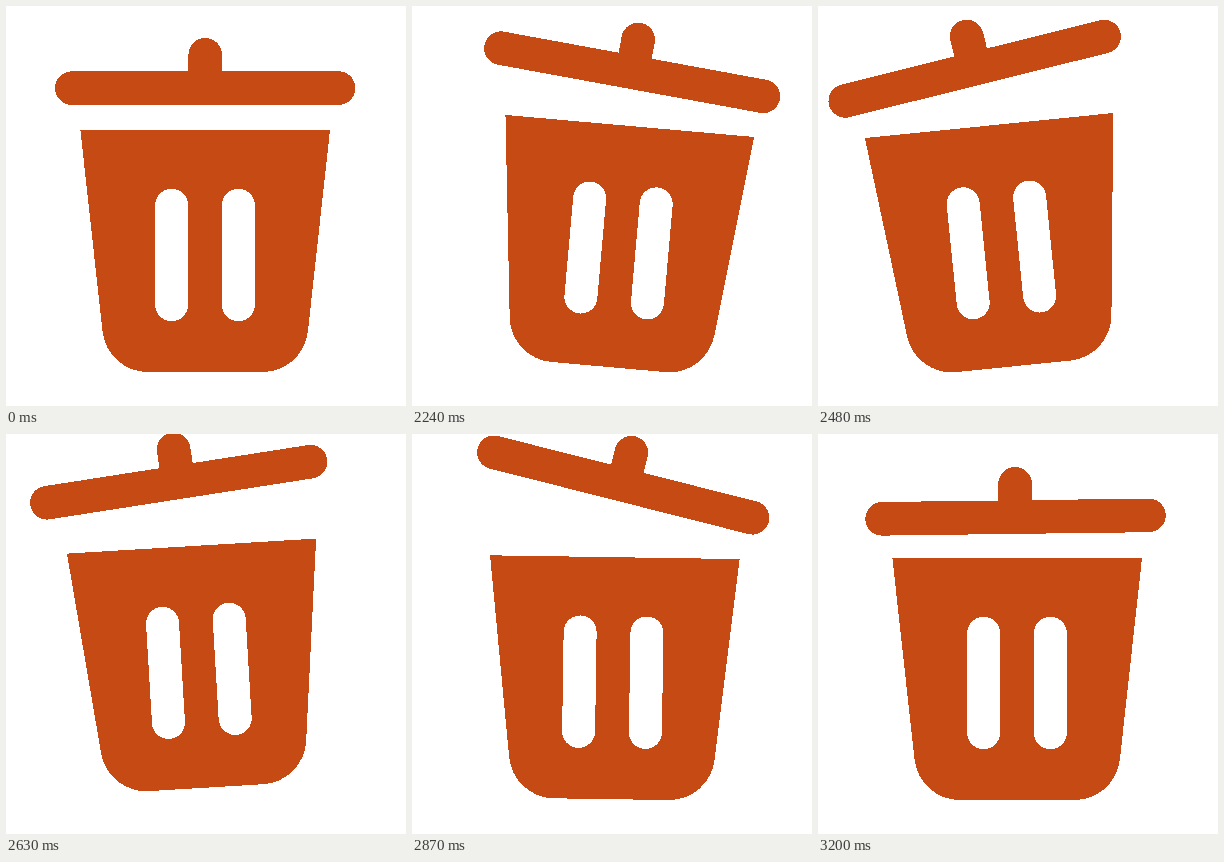
These frames come from a looping animation (400x400 px, 3.26 s). An HTML page:

```html
<!DOCTYPE html>
<html lang="en">
<head>
<meta charset="utf-8">
<title>Trash can</title>
<style>
  html, body { margin: 0; width: 100%; height: 100%; overflow: hidden; background: #fff; }
  svg { display: block; width: 400px; height: 400px; shape-rendering: crispEdges; }
  path { fill: #c64a14; }
  line { stroke: #c64a14; stroke-width: 33.6; stroke-linecap: round; }
  .slot { stroke: #fff; stroke-width: 33; }
</style>
</head>
<body>
<svg viewBox="0 0 400 400">
  <g id="body">
    <path d="M74.4 124H324L301.9 325.4A45.5 45.5 0 0 1 256.6 366H141.8A45.5 45.5 0 0 1 96.5 325.4Z"/>
    <line class="slot" x1="165.6" y1="199.3" x2="165.6" y2="298.7"/>
    <line class="slot" x1="232.4" y1="199.3" x2="232.4" y2="298.7"/>
  </g>
  <g id="lid">
    <line x1="65.8" y1="82.1" x2="332.6" y2="82.1"/>
    <line x1="199.2" y1="48.8" x2="199.2" y2="82.1"/>
  </g>
</svg>
<script>
const LOOP = 3260, START = 2030, LAST = 3200, STEP = 30;
const CENTER_X = 199.2, LID_Y = 82.1;
const FOOT_DX = 54.8, FOOT_Y = 332;

const body = document.getElementById('body');
const lid = document.getElementById('lid');

const clamp = u => Math.min(1, Math.max(0, u));
const progress = (t, from, to) => clamp((t - from) / (to - from));

function ease(t, from, to) {
  const u = progress(t, from, to);
  return u * u * (3 - 2 * u);
}

const arch = (t, from, to) => Math.sin(Math.PI * progress(t, from, to));

// Eases from rest through a series of [time, value] turning points
function swing(t, start, ...turns) {
  let value = 0, from = start;
  for (const [to, goal] of turns) {
    if (t <= from) break;
    value += (goal - value) * ease(t, from, to);
    from = to;
  }
  return value;
}

function pose(part, x, y, angle, pivotX, pivotY) {
  part.setAttribute('transform',
    `translate(${x} ${y}) rotate(${angle} ${pivotX} ${pivotY})`);
}

// The can rocks on whichever foot it leans towards, then hops upright
function poseBody(t) {
  const angle = swing(t, 2003, [2240, 5.07], [2480, -5.76], [2857, 0.87], [3120, 0]);
  const shift = swing(t, 2240, [2480, -7], [2700, 0.8], [3120, 0]);
  const hop = 10.2 * arch(t, 2510, 2860);
  pose(body, shift, -hop, angle, CENTER_X + Math.sign(angle) * FOOT_DX, FOOT_Y);
}

// The lid lags behind, is thrown up and settles last
function poseLid(t) {
  const angle = swing(t, START, [2295, 11.7], [2518, -16.1], [2870, 14.2], [3080, -3.5], [3250, 0]);
  const x = swing(t, START, [2295, 23.6], [2492, -43.2], [2870, 12], [3080, -8], [3250, 0]);
  const lift = 17 * ease(t, START, 2280) + 20 * ease(t, 2420, 2700) - 38 * ease(t, 2760, 3200);
  pose(lid, x, -lift, angle, CENTER_X, LID_Y);
}

function frame(now) {
  const t = now % LOOP;
  const held = t < START ? 0
    : Math.min(LAST, START + Math.floor((t - START) / STEP) * STEP);
  poseBody(held);
  poseLid(held);
  requestAnimationFrame(frame);
}
requestAnimationFrame(frame);
</script>
</body>
</html>
```
